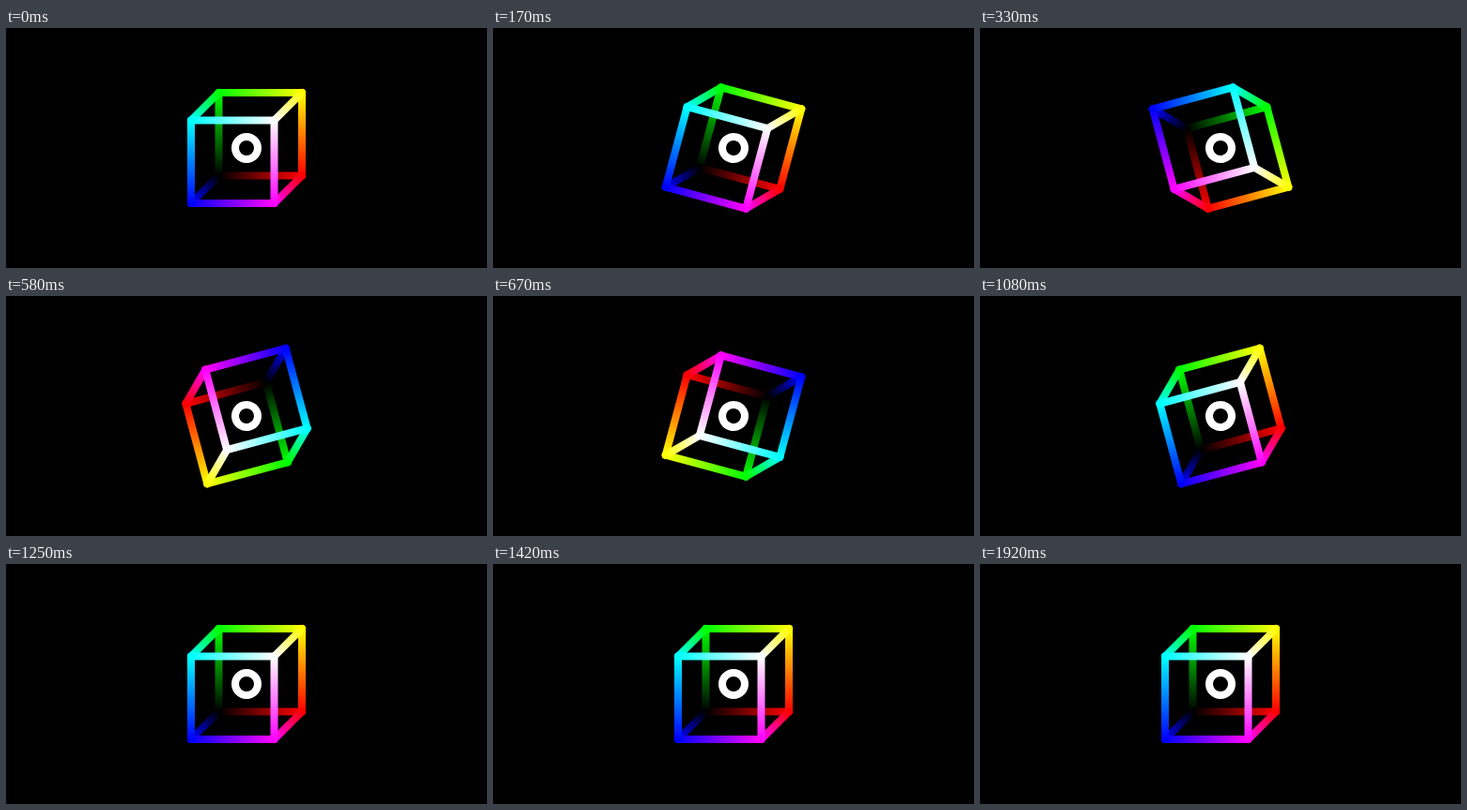
An HTML page with a canvas for the animation above (2010 ms loop, 512 px wide and 256 px high).

```html
<!DOCTYPE html>
<html lang="en">
<head>
<meta charset="utf-8">
<title>Colour cube</title>
<style>
  html, body { margin: 0; width: 100%; height: 100%; overflow: hidden; background: #000; }
  canvas { display: block; width: 512px; height: 256px; }
</style>
</head>
<body>
<canvas id="stage" width="512" height="256"></canvas>
<script>
const ctx = document.getElementById('stage').getContext('2d');
const LOOP = 2010;
const STEP = 250 / 3;
const STEPS = 24;
const SPIN_END = 15;
const SIDE = 88.5;
const DEPTH = 29.5;

// Each corner is an RGB triple: red runs right, green up, blue towards the viewer.
const place = ([r, g, b]) => [
  -DEPTH + SIDE * r - DEPTH * b,
  DEPTH - SIDE * g + DEPTH * b
];
const colour = c => `rgb(${c.map(v => v * 255).join(',')})`;
const level = c => c[0] + c[1] + c[2];

function makeEdge(from, axis) {
  const to = from.map((v, i) => i === axis ? 1 : v);
  const a = place(from), b = place(to);
  const paint = ctx.createLinearGradient(...a, ...b);
  paint.addColorStop(0, colour(from));
  paint.addColorStop(1, colour(to));
  return { a, b, paint, order: level(from) };
}

const edges = [];
for (let n = 0; n < 8; n++) {
  const corner = [n & 1, n >> 1 & 1, n >> 2];
  corner.forEach((v, axis) => { if (!v) edges.push(makeEdge(corner, axis)); });
}
edges.sort((p, q) => p.order - q.order);

// A small wind-up, one steady turn with overshoot, then rest.
function angleAt(step) {
  return step === 0 || step >= SPIN_END ? 0 : 30 * step - 45;
}

function draw(step) {
  ctx.setTransform(1, 0, 0, 1, 0, 0);
  ctx.fillStyle = '#000';
  ctx.fillRect(0, 0, 512, 256);
  ctx.translate(256, 128);
  ctx.rotate(angleAt(step) * Math.PI / 180);
  ctx.lineWidth = 8;
  ctx.lineCap = 'round';
  for (const { a, b, paint } of edges) {
    ctx.strokeStyle = paint;
    ctx.beginPath();
    ctx.moveTo(...a);
    ctx.lineTo(...b);
    ctx.stroke();
  }
  ctx.strokeStyle = '#fff';
  ctx.beginPath();
  ctx.arc(0, 0, 12, 0, 2 * Math.PI);
  ctx.stroke();
}

const start = performance.now();
function tick() {
  const t = (performance.now() - start) % LOOP;
  // Steps fall on times rounded to 10 ms.
  draw(Math.min(STEPS - 1, Math.floor((t + 5) / STEP)));
  requestAnimationFrame(tick);
}
tick();
</script>
</body>
</html>
```
